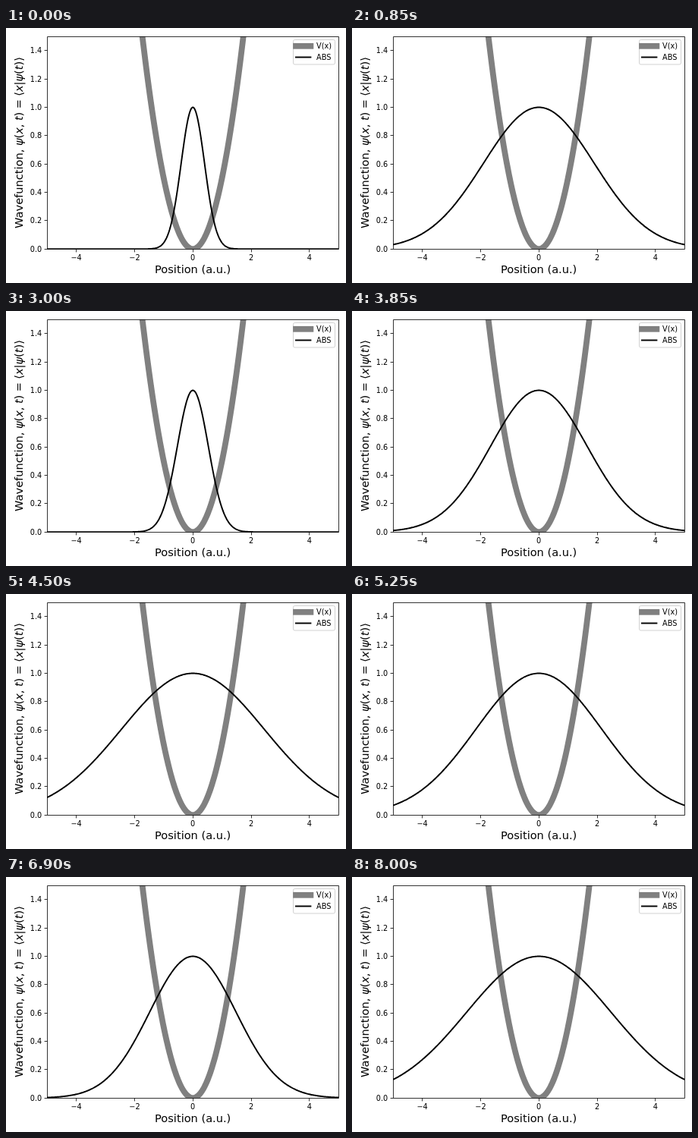
An HTML page that plays this animation: 448x336 px, repeating every 8.05 s.

```html
<!DOCTYPE html>
<html lang="en">
<head>
<meta charset="utf-8">
<title>Breathing wave packet</title>
<style>
html, body { margin: 0; width: 100%; height: 100%; overflow: hidden; background: #fff; }
svg { display: block; font: 9.72px "DejaVu Sans", sans-serif; }
.label { font-size: 14.58px; text-anchor: middle; }
i, .v { font-style: italic; }
path { fill: none; stroke: #000; }
.pot { stroke: #808080; stroke-width: 7.78; }
.abs { stroke-width: 1.94; }
.axis { stroke-width: .8; }
.legend path { stroke-linecap: square; }
</style>
</head>
<body>
<svg width="448" height="336" viewBox="0 0 448 336">
  <clipPath id="area"><rect x="54" y="11" width="384.5" height="280.5"/></clipPath>
  <g clip-path="url(#area)" stroke-linejoin="round">
    <path id="pot" class="pot"/>
    <path id="abs" class="abs"/>
  </g>
  <path class="axis" d="M54.5 11.5H438.5V291.5H54.5Z"/>
  <path id="ticks" class="axis"/>
  <g id="numbers"></g>
  <text class="label" x="246.2" y="323">Position (a.u.)</text>
  <text class="label" transform="translate(22 151) rotate(-90)">Wavefunction, <tspan class="v">ψ</tspan>(<tspan class="v">x</tspan>,<tspan class="v" dx=".3em">t</tspan>)<tspan dx=".3em">=</tspan><tspan dx=".3em">⟨</tspan><tspan class="v">x</tspan>|<tspan class="v">ψ</tspan>(<tspan class="v">t</tspan>)⟩</text>
  <g class="legend">
    <rect x="378.5" y="15.5" width="55" height="32.5" rx="2" fill="#fff" fill-opacity=".8" stroke="#ccc" stroke-width=".9"/>
    <path class="pot" d="M382 23.8H401.4"/>
    <path class="abs" d="M382 38.5H401.4"/>
    <text x="409" y="27.4">V(x)</text>
    <text x="409" y="41.8">ABS</text>
  </g>
</svg>
<script>
const $ = id => document.getElementById(id);
const X = x => 246.2 + 38.4 * x;
const Y = y => 291.2 - 186.67 * y;
const snap = v => Math.floor(v) + .5;

function plot(id, f) {
  let d = '';
  for (let i = -200; i <= 200; i++) {
    const x = i / 40;
    d += (d ? 'L' : 'M') + X(x).toFixed(2) + ' ' + Y(f(x)).toFixed(2);
  }
  $(id).setAttribute('d', d);
}

let ticks = '', numbers = '';
for (let x = -4; x <= 4; x += 2) {
  ticks += `M${snap(X(x))} 291.5v3.9`;
  numbers += `<text x="${X(x)}" y="305.7" text-anchor="middle">${String(x).replace('-', '−')}</text>`;
}
for (let i = 0; i < 8; i++) {
  const y = Y(i / 5);
  ticks += `M54.5 ${snap(y)}h-3.9`;
  numbers += `<text x="47.2" y="${y + 3.6}" text-anchor="end">${(i / 5).toFixed(1)}</text>`;
}
$('ticks').setAttribute('d', ticks);
$('numbers').innerHTML = numbers;
plot('pot', x => x * x / 2);

// Squeezed state in a harmonic well: the squared width swings between w and 1/w.
const w = .16, step = 50, loop = 8050;
let shown = -1;
const start = performance.now();

function draw(now) {
  const n = Math.floor(Math.max(0, now - start) % loop / step);
  if (n !== shown) {
    shown = n;
    const t = n * step / 1000;
    const b2 = w * Math.cos(t) ** 2 + Math.sin(t) ** 2 / w;
    plot('abs', x => Math.exp(-x * x / (2 * b2)));
  }
  requestAnimationFrame(draw);
}
draw(start);
</script>
</body>
</html>
```
